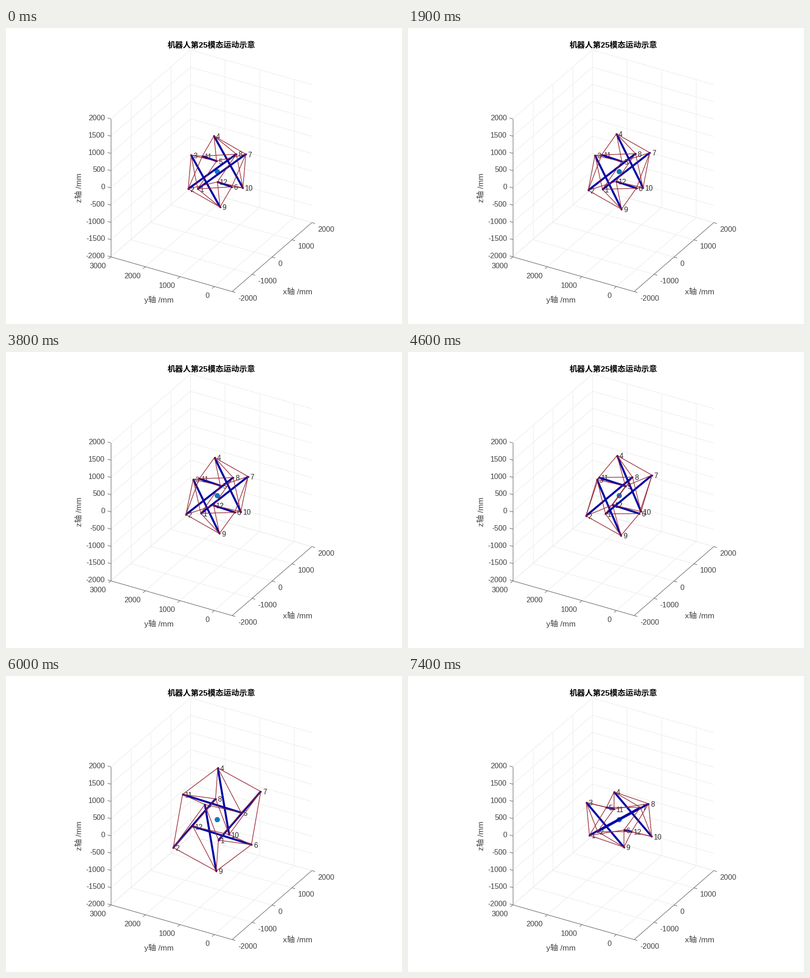
These frames come from a looping animation (865x648 px, 7500 ms). A matplotlib script:

```python
from itertools import combinations

import numpy as np
import matplotlib.pyplot as plt
from matplotlib.animation import FuncAnimation
from matplotlib.collections import LineCollection

W, H, DPI = 865, 648, 100
PX = 72 / DPI
FONTS = ["Liberation Sans", "Noto Sans CJK JP"]

fig = plt.figure(figsize=(W / DPI, H / DPI), dpi=DPI, facecolor="white")
ax = fig.add_axes([0, 0, 1, 1])
ax.set_xlim(0, W)
ax.set_ylim(H, 0)
ax.axis("off")


def label(x, y, s, size=16.1, color="#414141", **kw):
    """Text whose digits are centred on y (pixels)."""
    if "rotation" not in kw:
        y += 0.355 * size
    return ax.text(x, y, s, fontsize=size * PX, color=color,
                   fontfamily=FONTS, **kw)


def lines(segs, color, width, z, **kw):
    lc = LineCollection(segs, colors=color, linewidths=width * PX, zorder=z, **kw)
    return ax.add_collection(lc)


# Axis box: left floor corner and the edge vectors on screen
corner = np.array([229.0, 501.0])
ex = np.array([174.0, -151.0])
ey = np.array([265.0, 76.0])
ez = np.array([0.0, -302.0])
front = corner + ey

grid = []
edges = [(corner, corner + ez), (corner, front), (front, front + ex)]


def ticks(start, edge, fracs, first, step, mark, shift, ha, walls):
    """Tick marks, tick labels and the grid lines that meet at each tick."""
    for i, f in enumerate(fracs):
        p = start + f * edge
        edges.append((p, p + mark))
        label(p[0] + shift[0], p[1] + shift[1], f"{first + i * step}", ha=ha)
        for base, direction in walls:
            q = base + f * edge
            grid.append((q, q + direction))


ticks(corner, ez, np.linspace(0, 1, 9), -2000, 500, (-7, -2), (-13, -2.5),
      "right", [(corner, ex), (corner + ex, ey)])
ticks(corner, ey, np.arange(4) * 0.2845, 3000, -1000, (-5, 4.4), (-10.5, 19.5),
      "right", [(corner, ex), (corner + ex, ez)])
ticks(front, ex, np.linspace(0, 1, 5), -2000, 1000, (7, 2), (13, 14),
      "left", [(corner, ey), (corner, ez)])
lines(grid, "#e9e9e9", 1, 1)
lines(edges, "#6e6e6e", 1.2, 2)

label(448.7, 37, "机器人第25模态运动示意", 17.2, "black", ha="center", weight="bold")
label(637, 577, "x轴 /mm", 17.3, ha="center")
label(334, 595, "y轴 /mm", 17.3, ha="center")
label(160, 350, "z轴 /mm", 17.3, ha="center", va="center", rotation=90)


def bar_ends(half, side):
    """Ends of three pairs of parallel bars: half-length and sideways offset."""
    return np.array([su * u + sv * v for sv in (-1, 1)
                     for v, u in zip(half, side) for su in (1, -1)])


def at_rest(axes):
    """Each pair is offset by half a half-bar along the previous axis."""
    return axes, -np.roll(axes, 1, axis=0) / 2


# A regular six-bar tensegrity: cables join ends sqrt(1.5) half-bars apart
unit = bar_ends(*at_rest(np.eye(3)))
bars = [(i, i + 6) for i in range(6)]
cables = [(i, j) for i, j in combinations(range(12), 2)
          if np.isclose(np.sum((unit[i] - unit[j]) ** 2), 1.5)]

# Projected rest axes, and the mode shape as a change of half and side
centre = np.array([460.9, 314.2])
half, side = at_rest(np.array([(53.7, -35.4), (34.9, 54), (-7.2, -2.9)]))
half_mode = np.array([(11.5, 27.5), (34.5, -28.9), (87, 26.2)])
side_mode = np.array([(-70, 14.5), (-19.5, -34.1), (-9.5, 12.2)])


def nodes(k):
    phase = 0.1 * int(3.33 * k + 1.75) - 0.02
    q = -0.045 - 0.645 * np.sin(phase)
    return centre + bar_ends(half + q * half_mode, side + q * side_mode)


ax.plot(*centre, "o", ms=11.5 * PX, mfc="#1279bd", mew=0, zorder=3)
tags = [label(0, 0, str(i + 1), 15.6, "#262626", zorder=3) for i in range(12)]
bar_art = lines([], "#0808a6", 4.4, 4, capstyle="butt")
cable_art = lines([], "#962630", 1.6, 5, alpha=0.9)
dot_art, = ax.plot([], [], "o", ms=4.2 * PX, mfc="#5a1060", mew=0, zorder=6)


def draw(k):
    p = nodes(k)
    bar_art.set_segments([p[list(b)] for b in bars])
    cable_art.set_segments([p[list(c)] for c in cables])
    dot_art.set_data(p[:, 0], p[:, 1])
    for tag, (x, y) in zip(tags, p):
        tag.set_position((x + 4.7, y + 6.4))
    return [bar_art, cable_art, dot_art, *tags]


anim = FuncAnimation(fig, draw, frames=75, interval=100, repeat=True,
                     repeat_delay=0, init_func=lambda: draw(0))
plt.show()
```
